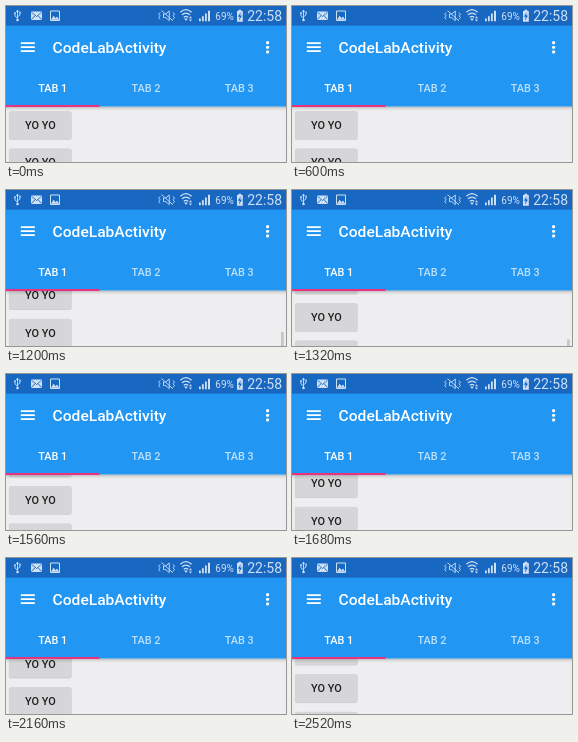
Write an HTML page that moves like this. It is 280 by 156 pixels and loops after 2640 ms.

```html
<!DOCTYPE html>
<html lang="en">
<head>
<meta charset="utf-8">
<title>Scrolling tabs</title>
<style>
html, body { margin: 0; width: 100%; height: 100%; overflow: hidden; background: #eeedf0; }
svg { display: block; width: 100vw; height: 100vh; }
text { font: 500 10.89px Roboto, sans-serif; }
.line { fill: none; stroke: #fff; }
.white { fill: #fff; }
.status { fill: #cfe0f3; }
.status .line { stroke: #cfe0f3; }
.status text { font-weight: 400; }
.mid { text-anchor: middle; }
</style>
</head>
<body>
<svg viewBox="0 0 280 156">
  <defs>
    <linearGradient id="shade" x2="0" y2="1">
      <stop stop-color="#000" stop-opacity=".24"/>
      <stop offset=".4" stop-color="#000" stop-opacity=".09"/>
      <stop offset="1" stop-color="#000" stop-opacity="0"/>
    </linearGradient>
    <g id="button">
      <rect x="2.7" y="105.4" width="63" height="28.6" rx="2" opacity=".06"/>
      <rect x="3" y="105.4" width="62.4" height="28.1" rx="1.8" opacity=".12"/>
      <rect x="3.1" y="105.2" width="62.2" height="28" rx="1.6" fill="#d6d6d8"/>
      <text class="mid" x="34.4" y="123.1" fill="#1f1f1f">YO YO</text>
    </g>
  </defs>

  <rect width="280" height="156" fill="#eeedf0"/>
  <g id="list"></g>
  <rect id="bar" x="275" y="101" width="2.8" height="185" fill="#c6c6c6"/>
  <rect y="100.5" width="280" height="4.5" fill="url(#shade)"/>

  <!-- app bar and tabs -->
  <rect width="280" height="100.5" fill="#2196f3"/>
  <rect y="99" width="93.4" height="2" fill="#e8337f"/>
  <path class="line" stroke-width="1.6" d="M14.8 37.1h14M14.8 41.1h14M14.8 45.1h14"/>
  <g class="white">
    <text x="46.6" y="46.6" style="font-size:15.56px">CodeLabActivity</text>
    <circle cx="261.6" cy="36.7" r="1.6"/>
    <circle cx="261.6" cy="41.3" r="1.6"/>
    <circle cx="261.6" cy="45.9" r="1.6"/>
    <text class="mid" x="46.7" y="85.8">TAB 1</text>
    <g opacity=".7">
      <text class="mid" x="140" y="85.8">TAB 2</text>
      <text class="mid" x="233.3" y="85.8">TAB 3</text>
    </g>
  </g>

  <!-- status bar -->
  <rect width="280" height="19.6" fill="#1868c2"/>
  <g class="status">
    <path class="line" stroke-width=".9" d="M11.5 5v9M11.5 12L9 10V7.6M11.5 10.8L14 9V7"/>
    <path d="M10 6l1.5-2.5L13 6zM8.2 6.3h1.6V8H8.2zM13.2 5.7h1.6v1.6h-1.6z"/>
    <circle cx="11.5" cy="14" r="1.3"/>
    <rect x="25" y="5.5" width="11" height="8.5" rx=".6"/>
    <path class="line" stroke-width="1" d="M44.5 5h9v9.5h-9z"/>
    <path d="M45 13.8l2.6-4 2 2.4 1.4-1.6 2.2 3.2z"/>
    <path class="line" stroke-width=".9" d="M154.2 6.5l-1.5 1.7 1.5 1.7-1.5 1.7 1.5 1.7M167 6.5l1.5 1.7-1.5 1.7 1.5 1.7-1.5 1.7M157.5 8h2.2l3.6-3v9.6l-3.6-3h-2.2zM155.5 4.6L167 14.8"/>
    <path class="line" stroke-width="1.2" d="M174.4 6.2q5.6-5 11.2 0M176 8.8q4-3.4 8 0M177.8 11.2q2.2-1.8 4.4 0"/>
    <path d="M178.2 12.6h3.6L180 15zM183 12.2l1.5-2 1.5 2zM183 13.4h3l-1.5 2z"/>
    <path d="M193 12.6h1.8v2.6H193zM196 10.2h1.8v5H196zM199 7.6h1.8v7.6H199zM202 4.8h2v10.4h-2z"/>
    <path d="M231 5h1.5V3.8h2.8V5h1.5v10.7H231z"/>
    <text x="209.3" y="14.2" style="font-size:10px">69%</text>
    <text x="241.2" y="15.3" style="font-size:14px">22:58</text>
  </g>
  <g fill="#1868c2">
    <path d="M25.4 6.2l5.1 4.3 5.1-4.3M25.4 13.6l3.6-4M35.6 13.6l-3.6-4" fill="none" stroke="#1868c2" stroke-width=".9"/>
    <path d="M234.8 5.9l-3 4.9h1.9l-.8 4 3.2-5.2h-2z"/>
  </g>
</svg>
<script>
const LOOP = 2640, STEP = 120, PITCH = 37.33;
const list = document.getElementById('list');
const bar = document.getElementById('bar');

for (let i = 0; i < 23; i++) {
  const use = document.createElementNS('http://www.w3.org/2000/svg', 'use');
  use.setAttribute('href', '#button');
  use.setAttribute('y', i * PITCH);
  list.append(use);
}

// [step, scroll, speed per step]
const drag = [[5, 0, 16], [8, 58.3, 17], [11, 104, 17], [14, 159, 14], [18, 200, 7], [21, 212.8, 2]];

function scrollAt(step) {
  if (step <= drag[0][0]) return 0;
  const i = drag.findIndex(k => k[0] >= step);
  const [t0, p0, v0] = drag[i - 1], [t1, p1, v1] = drag[i];
  const d = t1 - t0, u = (step - t0) / d, w = 1 - u;
  return w * w * ((1 + 2 * u) * p0 + u * d * v0) + u * u * ((3 - 2 * u) * p1 - w * d * v1);
}

function draw(now) {
  const y = scrollAt(Math.floor(now % LOOP / STEP));
  list.setAttribute('transform', `translate(0 ${-y})`);
  bar.setAttribute('y', 101 + y * 0.466);
  bar.setAttribute('opacity', y > 0 ? 1 : 0);
}

let start;
function tick(now) {
  start ??= now;
  draw(now - start);
  requestAnimationFrame(tick);
}
draw(0);
requestAnimationFrame(tick);
</script>
</body>
</html>
```
